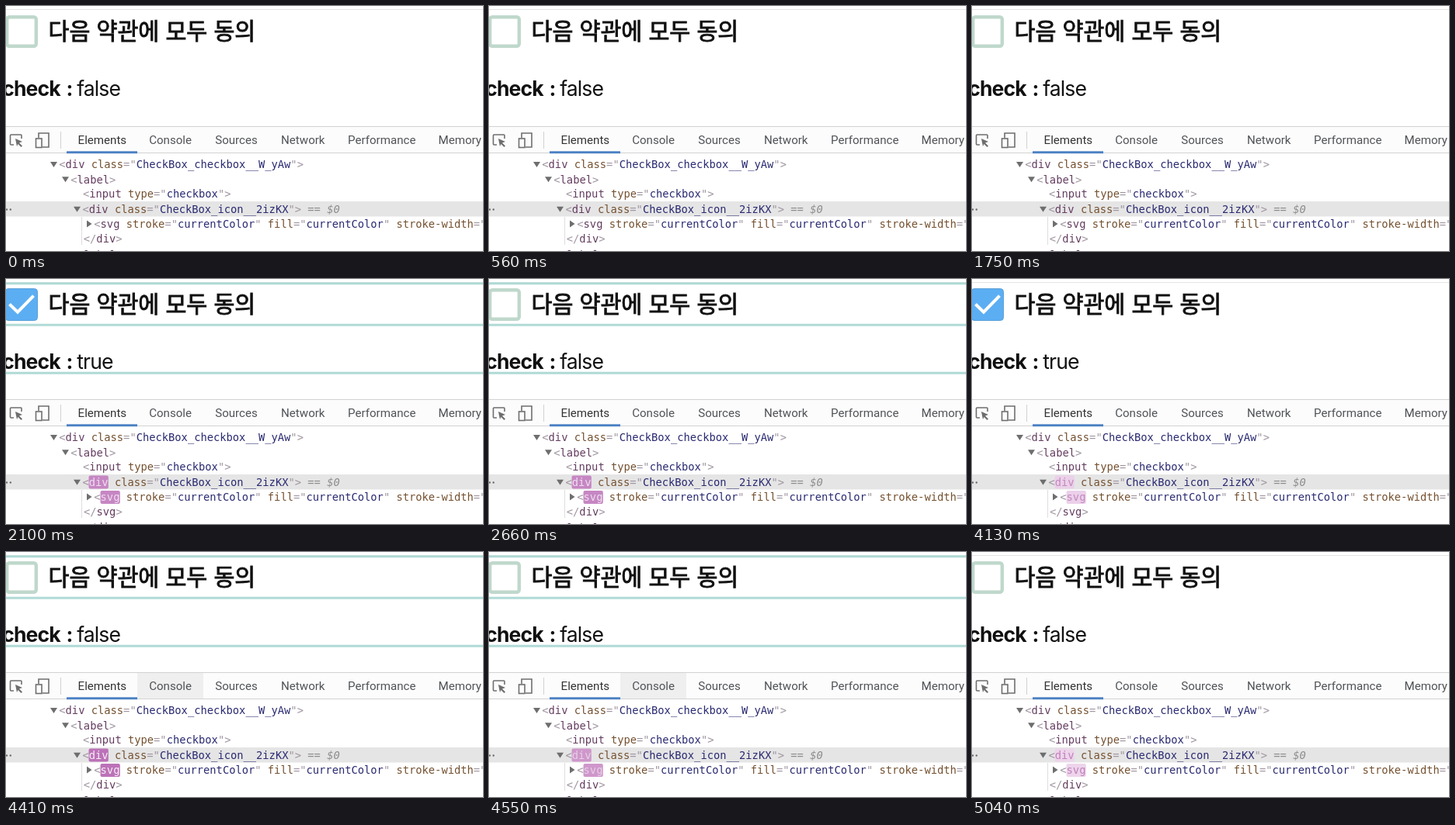
These frames come from a looping animation (614 by 316 pixels, 5110 ms). An HTML page:

```html
<!DOCTYPE html>
<html lang="ko">
<head>
<meta charset="utf-8">
<title>Checkbox and element inspector</title>
<style>
  html, body { margin: 0; width: 100%; height: 100%; overflow: hidden; background: #fff; }
  svg { display: block; width: 614px; height: 316px; }
  .label { font: 400 29.25px "Noto Sans CJK KR", "Noto Sans CJK", "Noto Sans CJK JP", sans-serif; stroke: #111; stroke-width: .9; fill: #111; }
  .state { font: 400 26.5px Inter, sans-serif; letter-spacing: -.9px; fill: #111; }
  .state.key { font-weight: 700; word-spacing: 2.5px; }
  .tabs { font: 400 15.1px Roboto, sans-serif; fill: #505357; }
  .code text { font: 400 13.75px "DejaVu Sans Mono", monospace; white-space: pre; fill: #a096a0; }
  .code .t { fill: #643c60; }
  .code .a { fill: #74502f; }
  .code .v { fill: #2a2a72; }
  .code .ref { font-style: italic; fill: #8c8c8c; }
  .icon { fill: none; stroke: #6e6e6e; stroke-width: 1.6; }
</style>
</head>
<body>
<svg viewBox="0 0 614 316">
  <rect width="614" height="316" fill="#fff"/>
  <path d="M0 4.5h614" stroke="#e4e4e4"/>

  <g id="layers" stroke="#b0dad6" stroke-width="3">
    <path d="M0 5.7h614M0 59.3h614M0 121.3h614"/>
  </g>

  <rect id="empty" x="1.2" y="14.2" width="37.6" height="37.6" rx="3" fill="#fff" stroke="#bfd8cc" stroke-width="4.4"/>
  <g id="ticked">
    <rect x="-1" y="12.5" width="41.5" height="41" rx="4" fill="#5caef3" stroke="#5a9fd6"/>
    <path d="M4.5 32.5l10.5 10.2 20.5-21" fill="none" stroke="#fff" stroke-width="4"/>
  </g>
  <text class="label" x="54.5" y="43">다음 약관에 모두 동의</text>
  <text class="state key" x="85.5" y="116" text-anchor="end">check :</text>
  <text class="state" id="value" x="91.3" y="116">false</text>

  <rect y="155" width="614" height="35" fill="#fcfcfc"/>
  <rect id="hover" x="169" y="156" width="85" height="34" fill="#efefef"/>
  <path d="M0 155.5h614M0 189.5h614M70.5 162v22" stroke="#d2d2d2"/>
  <rect x="78" y="187.3" width="91" height="2.9" fill="#4a80c4"/>
  <g class="icon">
    <path d="M10 179H6.5q-1 0-1-1V167q0-1 1-1H19q1 0 1 1v4"/>
    <path d="M12 171l9 4-4 1.5 4 4-1.5 1.5-4-4-1.5 3z" fill="#6e6e6e" stroke="none"/>
    <path d="M42 170v-6h13v18H47"/>
    <rect x="38.5" y="171" width="7.5" height="11.5"/>
  </g>
  <g class="tabs">
    <text x="92.6" y="178.3" fill="#333">Elements</text>
    <text x="184.2" y="178.3">Console</text>
    <text x="269.2" y="178.3">Sources</text>
    <text x="354.1" y="178.3">Network</text>
    <text x="440.1" y="178.3">Performance</text>
    <text x="556.5" y="178.3">Memory</text>
  </g>

  <rect y="252" width="614" height="19.5" fill="#e5e5e5"/>
  <path d="M97.5 272v36" stroke="#dedede"/>
  <g fill="#6e6e6e">
    <path d="M57 201h9l-4.5 7zM72 220.3h9l-4.5 7zM87 258.8h9l-4.5 7zM104 276.5v9l6.5-4.5z"/>
    <circle cx="1" cy="262.5" r="1.2"/><circle cx="5.8" cy="262.5" r="1.2"/>
  </g>
  <rect id="divChip" x="106.5" y="253.5" width="25.3" height="17" rx="2"/>
  <rect id="svgChip" x="121.5" y="273" width="25.3" height="17" rx="2"/>
  <g class="code">
    <text x="68.3" y="209">&lt;<tspan class="t">div</tspan> <tspan class="a">class</tspan>="<tspan class="v">CheckBox_checkbox__W_yAw</tspan>"&gt;</text>
    <text x="83.3" y="229">&lt;<tspan class="t">label</tspan>&gt;</text>
    <text x="99" y="247">&lt;<tspan class="t">input</tspan> <tspan class="a">type</tspan>="<tspan class="v">checkbox</tspan>"&gt;</text>
    <text x="98.5" y="266.8">&lt;<tspan class="t" id="divName">div</tspan> <tspan class="a">class</tspan>="<tspan class="v">CheckBox_icon__2izKX</tspan>"&gt;<tspan class="ref"> == $0</tspan></text>
    <text x="113.3" y="286">&lt;<tspan class="t" id="svgName">svg</tspan> <tspan class="a">stroke</tspan>="<tspan class="v">currentColor</tspan>" <tspan class="a">fill</tspan>="<tspan class="v">currentColor</tspan>" <tspan class="a">stroke-width</tspan>="</text>
    <g id="closed">
      <text x="99.8" y="305">&lt;/<tspan class="t">div</tspan>&gt;</text>
      <text x="84" y="325.5">&lt;/<tspan class="t">label</tspan>&gt;</text>
    </g>
    <g id="wrapped">
      <text x="100" y="304.6">&lt;/<tspan class="t">svg</tspan>&gt;</text>
      <text x="99.8" y="324.5">&lt;/<tspan class="t">div</tspan>&gt;</text>
    </g>
  </g>
</svg>
<script>
  const LOOP = 5110, STEP = 70, LAYER_MS = 560, FADE_MS = 1400;
  const TREE_DELAY = 70; // the element tree updates just after the page
  const toggles = [1820, 2380, 3360, 4200];
  const $ = id => document.getElementById(id);
  const show = (id, on) => { $(id).style.display = on ? '' : 'none'; };
  const mix = (a, b, p) => `rgb(${a.map((v, i) => Math.round(v + (b[i] - v) * p))})`;

  // cubic-bezier(0, 0, .2, 1)
  function ease(x) {
    if (x >= 1) return 1;
    let lo = 0, hi = 1;
    for (let i = 0; i < 24; i++) {
      const s = (lo + hi) / 2;
      if (.6 * (1 - s) * s * s + s ** 3 < x) lo = s; else hi = s;
    }
    return 3 * (1 - lo) * lo * lo + lo ** 3;
  }

  function stateAt(t) {
    const count = toggles.filter(v => v <= t).length;
    return { checked: count % 2 === 1, age: count ? t - toggles[count - 1] : Infinity };
  }

  function highlight(name, age) {
    const lit = age < FADE_MS, p = ease(age / (FADE_MS * .8));
    const chip = $(name + 'Chip');
    show(name + 'Chip', lit);
    chip.style.fill = mix([158, 54, 153], [242, 222, 240], p);
    chip.style.opacity = Math.min(1, (FADE_MS - age) / (FADE_MS * .4));
    $(name + 'Name').style.fill = lit ? mix([255, 255, 255], [136, 18, 128], p * p * .6) : '';
  }

  function render(t) {
    const page = stateAt(t), tree = stateAt(t - TREE_DELAY);
    show('empty', !page.checked);
    show('ticked', page.checked);
    show('layers', page.age < LAYER_MS);
    $('value').textContent = String(page.checked);
    show('wrapped', tree.checked);
    show('closed', !tree.checked);
    highlight('svg', tree.age);
    highlight('div', tree.age);
    show('hover', t >= 4340 && t < 4760);
  }

  const start = performance.now();
  function tick() {
    const t = (performance.now() - start) % LOOP;
    render(Math.floor(t / STEP) * STEP);
    requestAnimationFrame(tick);
  }
  tick();
</script>
</body>
</html>
```
